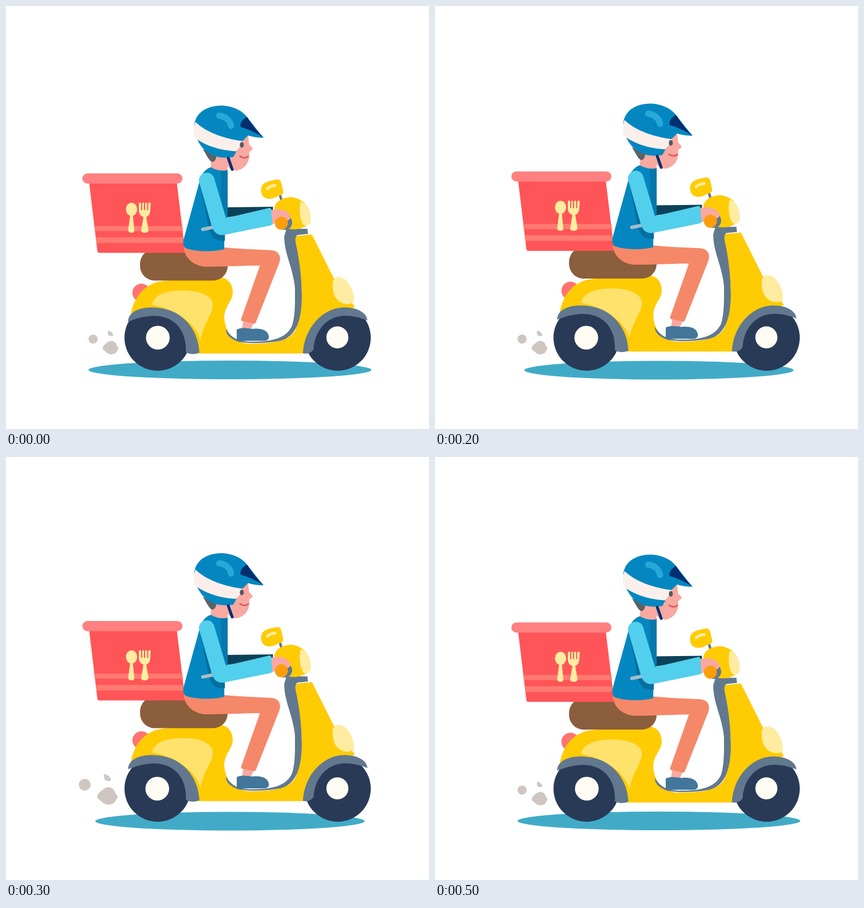
An HTML page for the animation above (0.6 s loop, 748 px wide and 748 px high).

```html
<!DOCTYPE html>
<html lang="en">
<head>
<meta charset="utf-8">
<title>Scooter delivery</title>
<style>
html, body { margin: 0; width: 100%; height: 100%; overflow: hidden; background: #fff; }
svg { display: block; width: 100vw; height: 100vh; }
.line { fill: none; stroke-linecap: round; }
.yellow { fill: #ffcb03; } .cream { fill: #ffeca0; } .slate { fill: #61788f; }
.skin { fill: #f8a9a1; } .blue { fill: #0487c0; } .navy { fill: #002f70; }
</style>
</head>
<body>
<svg viewBox="0 0 748 748">
  <ellipse id="shadow" cx="396" cy="643.5" rx="250" ry="16.5" fill="#41abc7"/>
  <g id="dust" fill="#cfc5c1">
    <circle cx="154" cy="589" r="8"/>
    <path d="M171 604C173 599 178 596 182 593C187 591 193 593 195 598C196 602 199 603 199 606C196 609 196 614 191 615C186 617 181 616 177 612C174 608 170 608 171 604Z"/>
    <path d="M180 574Q189 576 190 583Q185 585 181 582Z"/>
  </g>
  <g fill="#293a57">
    <circle cx="268" cy="586.5" r="58.5"/>
    <circle cx="586.5" cy="586.5" r="58.5"/>
  </g>
  <g fill="#fffdf3">
    <circle id="hub" cx="268.5" cy="586.5" r="21"/>
    <circle cx="586" cy="586" r="19.5"/>
  </g>

  <g id="ride">
    <!-- scooter -->
    <circle cx="239.5" cy="507" r="16" fill="#ff7473"/>
    <path class="yellow" d="M221 543C228 510 248 489 280 486C315 483 350 482 375 479C393 480 401 492 401 507C400 524 386 530 386 552C388 580 405 596 430 597C480 597 505 590 513 570L523 500L510 407L541 404L579 480L617 532L600 541C565 542 540 570 531 614L526 614.5H341L330 612C325 565 295 535 255 541L222 549Z"/>
    <path d="M258 528C263 508 288 502 320 503C350 505 366 515 366 529C365 546 349 561 344 591C336 563 310 547 285 536C273 531 264 530 258 528Z" fill="#ffe26c"/>
    <path class="slate" d="M216 558C216 541 236 533 258 533C311 533 340 571 342 613C336 616 325 617 318 612C320 574 298 548 262 548C245 548 232 552 216 558Z"/>
    <path class="slate" d="M525 614C527 570 560 533 598 533C625 533 639 545 639 556C620 548 602 546 588 549C561 555 545 580 544 607C538 616 531 615 525 614Z"/>
    <path class="slate" d="M496 394H533L534 403L515 405C511 408 511 414 513 422C521 460 523 490 523 518C522 560 511 585 485 592C460 597 430 597 412 594C396 589 388 580 389 571C398 587 410 592 430 593.5C465 594 495 590 506 565C512 545 511 520 511 500C508 462 492 440 492 407Z"/>
    <path class="cream" d="M578 487C582 478 591 477 600 484C612 496 617 512 615 523C607 531 591 527 584 517C578 510 577 497 578 487Z"/>
    <rect x="237" y="430" width="155" height="55.5" rx="26" fill="#8b5e3d"/>
    <path class="line" d="M485 336L490 353" stroke="#61788f" stroke-width="4.5"/>
    <path class="yellow" d="M451 326C451 313 461 310 478 307C484 306 486 309 487 314L490 327C491 331 489 334 484 335C478 337 475 341 466 341C457 341 451 335 451 326Z"/>
    <path class="line" d="M462 323Q467 318 476 317.5" stroke="#ffeca0" stroke-width="5"/>
    <path class="yellow" d="M474 357C478 344 490 338 505 338C525 340 537 355 538 372C537 388 527 393 512 395L496 394Z"/>
    <path class="cream" d="M521 346C533 349 540 363 539 381C537 389 530 390 525 386C519 375 518 358 521 346Z"/>

    <!-- box -->
    <path d="M147 312H302L317 436.5H165Q162 436.5 161.5 433Z" fill="#ff5558"/>
    <path d="M156 389H312L313 398H157ZM159 409H314L315 419H160Z" fill="#ff7a70"/>
    <rect x="135" y="296" width="177" height="18" rx="9" fill="#ff8081"/>
    <g fill="#ffeca0">
      <ellipse cx="222" cy="359.5" rx="10" ry="11.5"/>
      <path d="M220 367H224L227 397Q227 401 222 401Q216 401 216 396Z"/>
      <path d="M235 349Q237 346 239 349V361H241V349Q242.5 346 244 349V361H246V349Q248 346 249.5 349V361H251.5V349Q254 346 256 349L255 363Q254 371 248 373L252 396Q252 401 245 401Q239 401 239 397L243 373Q236 371 235 363Z"/>
    </g>

    <!-- rider -->
    <path class="skin" d="M420 555L438 560L433 572H417Z"/>
    <path d="M408 572C418 568 426 570 436 571C453 569 465 575 465 586C464 591 460 592 455 592H408Z" fill="#42769b"/>
    <path d="M314 426C335 434 365 433 386 427C420 430 455 431 470 432C484 434 487 444 483 455L442 559Q441 563 436 561L417 557Q415 556 416 553L449 459C420 459 390 461 352 461C330 459 316 445 314 426Z" fill="#f58869"/>
    <path d="M389 356L472 355V362L389 374Z" fill="#0c4259"/>
    <path class="skin" d="M364 260H390L392 291Q375 296 362 287Z"/>
    <path class="skin" d="M399 240L428 229L430 245C432 248 436 249 436 253C435 256 431 256 430 259C432 274 424 288 408 291C394 291 387 281 386 265Z"/>
    <path d="M348 253L372 265Q371 276 364 276C358 272 355 264 348 253Z" fill="#5b6365"/>
    <path class="blue" d="M362 285C349 290 345 300 342 311L314 413Q312 423 317 428C335 435 370 435 386 430V408L392 370V291Q376 293 362 285Z"/>
    <path d="M379 291Q386 292 392 290V372H387L379 335Q382 312 379 291Z" fill="#0577ab"/>
    <path d="M342 312L352 360L358 391C361 408 372 417 387 415V398L366 385Z" fill="#066f9f"/>
    <path class="line" d="M348 395L367 391" stroke="#a4bfcc" stroke-width="6"/>
    <circle class="slate" cx="493" cy="383" r="13"/>
    <path class="skin" d="M468 361C483 356 502 362 503 373Q503 381 490 379L469 387Z"/>
    <circle cx="487" cy="384" r="11.5" fill="#fb9e09"/>
    <path d="M341 309C342 292 363 290 368 304L389 375L466 357Q469 357 469 360L471 384Q471 387 468 388L384 405C371 406 366 397 363 386Z" fill="#52cfec"/>
    <path class="blue" d="M333 210C336 187 357 176 382 176C404 177 418 186 426 196L455 233Q441 233 428 229L417 240L402 267C394 268 385 269 375 267C350 261 334 240 333 210Z"/>
    <path d="M335 205C355 224 384 234 419 239Q415 249 407 257C376 255 350 246 333 232Q331 216 335 205Z" fill="#fbefec"/>
    <path class="navy" d="M426 196C419 200 413 207 415 214Q434 219 456 233Q440 218 426 196Z"/>
    <path class="line" d="M377 194C388 195 396 202 398 212" stroke="#27a9d8" stroke-width="11"/>
    <path class="line" d="M393 269L400 289" stroke="#002f70" stroke-width="5"/>
    <ellipse cx="417" cy="245.5" rx="3.5" ry="5" fill="#56595a"/>
    <path class="line" d="M414 266Q423 271 428 266" stroke="#d95f62" stroke-width="3"/>
  </g>
</svg>
<script>
const [ride, shadow, dust, hub] = ["ride", "shadow", "dust", "hub"].map(id => document.getElementById(id));

function draw(now) {
  const t = now % 600;
  const high = t >= 300 && t < 500;
  const narrow = t >= 200 && t < 500;
  const lift = t < 200 ? 0 : high ? 6 : 3.5;
  ride.setAttribute("transform", `translate(0 ${-lift})`);
  shadow.setAttribute("rx", narrow ? 238 : 250);
  shadow.setAttribute("cy", narrow ? 644 : 643.5);
  hub.setAttribute("cx", narrow ? 267.5 : 268.5);
  dust.setAttribute("transform", high ? "translate(-61 -186) scale(1.3)" : "");
  requestAnimationFrame(draw);
}
draw(performance.now());
</script>
</body>
</html>
```
